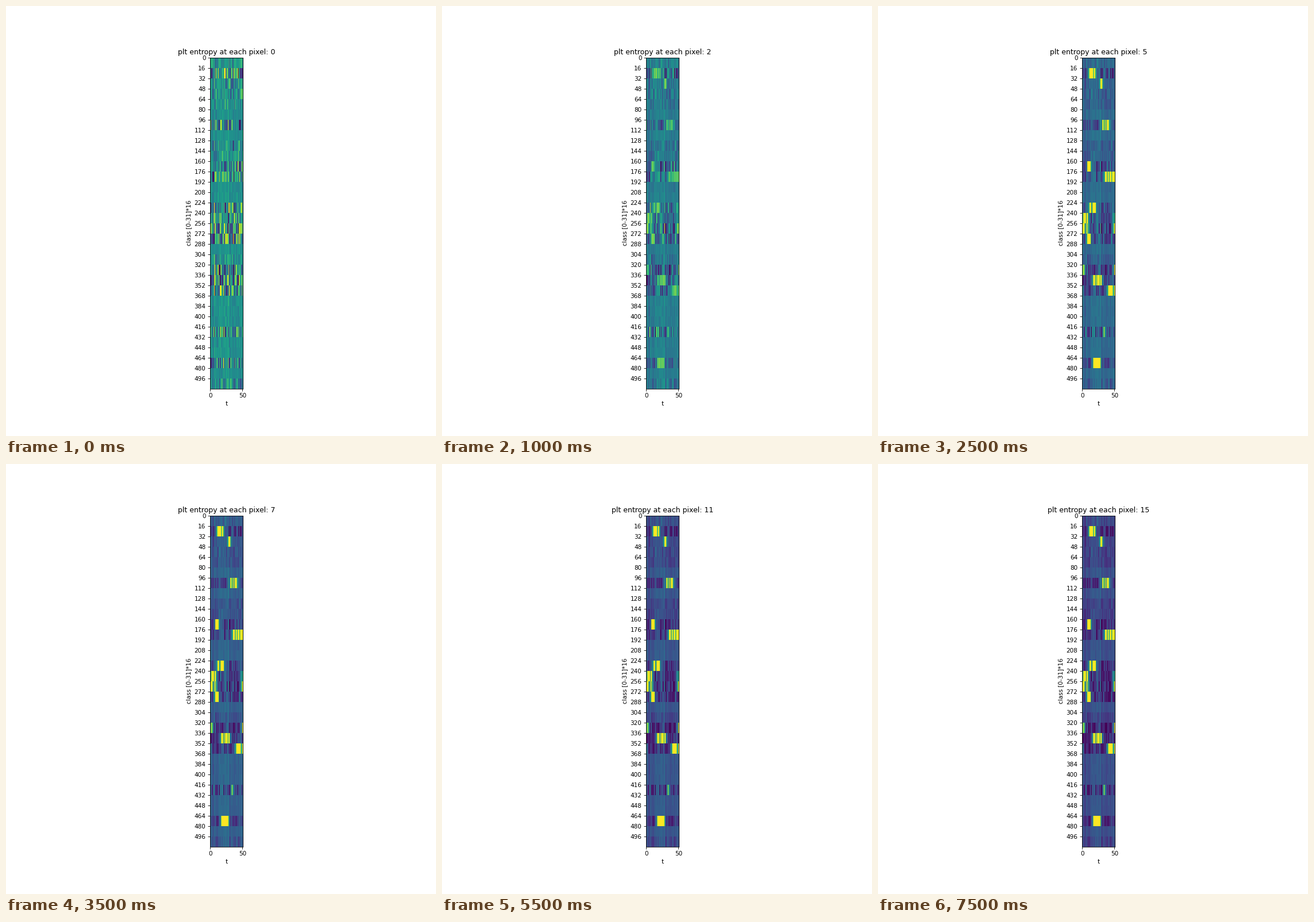
A matplotlib script that plays this animation: 748x748 px, repeating every 8000 ms.

```python
import numpy as np
import matplotlib.pyplot as plt
from matplotlib.animation import FuncAnimation

FRAMES, INTERVAL = 16, 500
CLASSES, STEPS, REPEAT = 32, 51, 16

# Active classes: centre and half width of the step range each one settles on
PEAKS = {1: (15, 4), 2: (29, 1), 6: (35, 5), 10: (10, 2), 11: (42, 7),
         14: (16, 5), 15: (3, 5), 16: (3, 5), 17: (10, 2), 20: (0, 2),
         21: (23, 6), 22: (45, 5), 26: (33, 0), 29: (22, 5)}
MEDIUM = [0, 2, 3, 4, 8, 9, 19, 31]

contrast = np.full((CLASSES, 1), .045)
contrast[list(PEAKS)] = .3
contrast[MEDIUM] = .14

rng = np.random.default_rng(16)
first, settled = rng.normal(size=(2, CLASSES, STEPS))
shared = rng.normal(size=STEPS)
gaps = np.where(rng.uniform(size=(CLASSES, STEPS)) < .2, .4, 1)
t = np.arange(STEPS)
hump = np.exp(-((t - 20) / 9) ** 2)


def glow(centre, half):
    """One inside the range, falling off around it; steps wrap around."""
    dist = np.abs((t - centre + STEPS / 2) % STEPS - STEPS / 2)
    return np.where(dist <= half, 1, .5 * np.exp(-((dist - half) / 3) ** 2))


def entropy(f):
    fresh = np.exp(-f / 2.5)
    base = .24 + .26 * np.exp(-f / 7)
    noise = np.sqrt(fresh) * first + np.sqrt(1 - fresh) * settled
    v = base + .05 * (hump - .35) + .03 * shared
    v = v + contrast * (noise * (.3 + .7 * fresh) - .5 * (1 - fresh))
    rise = min(1, (f + .5) / 4)
    for k, (centre, half) in PEAKS.items():
        v[k] += rise * gaps[k] * glow(centre, half) * (1 - v[k])
    return np.repeat(np.clip(v, 0, 1), REPEAT, axis=0)


fig, ax = plt.subplots(figsize=(10, 10), dpi=74.8)
image = ax.imshow(entropy(0), cmap="viridis", vmin=0, vmax=1)
ax.set_xticks([0, 50])
ax.set_yticks(range(0, CLASSES * REPEAT, REPEAT))
ax.set_xlabel("t")
ax.set_ylabel("class [0-31]*16")
title = ax.set_title("")


def update(f):
    image.set_data(entropy(f))
    title.set_text(f"plt entropy at each pixel: {f}")
    return image, title


anim = FuncAnimation(fig, update, frames=FRAMES, interval=INTERVAL,
                     repeat=True, repeat_delay=0)
plt.show()
```
